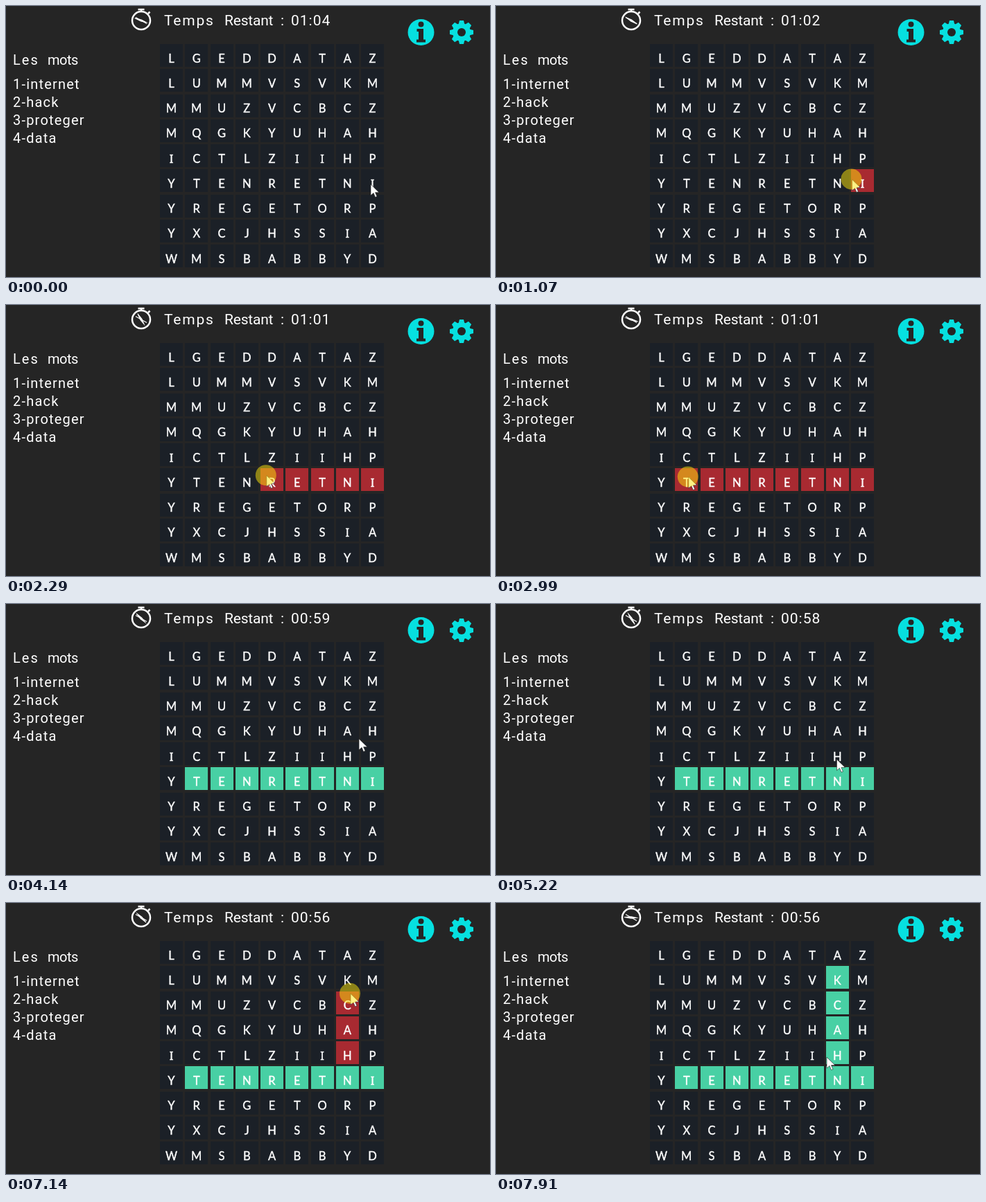
Recreate the animation shown at these times as an HTML page. Size 698 px wide and 392 px high, loop 7990 ms.

```html
<!DOCTYPE html>
<html lang="fr">
<head>
<meta charset="utf-8">
<title>Mots mêlés</title>
<style>
  html, body { margin: 0; width: 100%; height: 100%; overflow: hidden; background: #252525; }
  svg { display: block; width: 698px; height: 392px; }
  text { fill: #fff; white-space: pre; }
  .label { font-family: Roboto, sans-serif; }
  .letter { font: 16.5px Lato, sans-serif; text-anchor: middle; stroke: #fff; stroke-width: .4; }
  .serif-i { font-family: "Noto Sans", sans-serif; }
  #grid rect { shape-rendering: crispEdges; }
</style>
</head>
<body>
<svg id="stage" viewBox="0 0 698 392">
  <g fill="none" stroke="#fff" stroke-width="2.5">
    <circle cx="195" cy="21" r="13"/>
    <path d="M190.500 5h9M195 5v4M205 11l2.500-2.500"/>
  </g>
  <path d="M187 16.500L203 25.500" stroke="#fff" stroke-width="1.200"/>
  <path id="hand" fill="#fff" d="M11 0L0 1.700L-10 .5V-.5L0-1.700Z"/>
  <g fill="#06e0e0">
    <circle cx="598.500" cy="38" r="19"/>
    <g id="gear" transform="translate(657 38)"><circle r="13"/></g>
  </g>
  <g fill="#252525">
    <circle cx="657" cy="38" r="6"/>
    <circle cx="598.500" cy="26.500" r="4"/>
    <path d="M592.500 33h9.500v15.500h3v4h-13v-4h3v-11.500h-2.500z"/>
  </g>
  <g id="labels"></g>
  <g id="grid"></g>
  <g id="pointer">
    <path d="M0 0V16L4 12.500L6.500 18.500L9 17.500L6.500 11.700H12Z" fill="#fff" stroke="#222" stroke-width=".6"/>
    <circle id="press" cx="-1" cy="-.5" r="15" fill="#ffe60a" fill-opacity=".5"/>
  </g>
</svg>
<script>
const LOOP = 7990, STEP = 76.9;
const ROWS = ['LGEDDATAZ', 'LUMMVSVKM', 'MMUZVCBCZ', 'MQGKYUHAH', 'ICTLZIIHP',
              'YTENRETNI', 'YREGETORP', 'YXCJHSSIA', 'WMSBABBYD'];
const LEFT = 222, TOP = 55, PITCH = 36.25, CELL = 33;
const DARK = '#1b2027', RED = '#a82a31', GREEN = '#48d0a4';

// Pointer keyframes: time, x, y
const PATH = [
  [0, 526, 258], [850, 527, 254], [950, 526, 252], [1680, 444, 245], [2990, 277, 249],
  [3370, 279, 247], [3900, 514, 202], [4140, 509, 195], [4800, 495, 226], [5500, 489, 224],
  [5910, 488, 218], [6140, 487, 205], [7140, 497, 131], [7360, 498, 112], [7560, 498, 115],
  [7860, 477, 223]
];
// Each drag starts on one cell and runs along a row or a column
const DRAGS = [
  { from: 910, to: 3150, row: 5, col: 8, axis: 'x' },
  { from: 5600, to: 7460, row: 4, col: 7, axis: 'y' }
];

const byId = id => document.getElementById(id);

function add(parent, tag, attrs, content = '') {
  const node = document.createElementNS('http://www.w3.org/2000/svg', tag);
  for (const name in attrs) node.setAttribute(name, attrs[name]);
  node.textContent = content;
  return parent.appendChild(node);
}

function label(content, x, y, size, spacing) {
  return add(byId('labels'), 'text',
    { x, y, class: 'label', 'font-size': size, 'letter-spacing': spacing }, content);
}

label('Temps', 228, 28, 21, 1.8);
label('Restant', 315, 28, 21, -0.2);
label(':', 396, 28, 21, 0);
const clock = label('', 411, 28, 21, 1);
label('Les', 10, 85, 20, 2);
label('mots', 60, 85, 20, -0.5);
['internet', 'hack', 'proteger', 'data'].forEach((word, i) =>
  label(`${i + 1}-${word}`, 10, 120 + 26 * i, 20, 1.2));

for (let angle = 0; angle < 360; angle += 45)
  add(byId('gear'), 'path', { d: 'M-3 -17H3L4.5 -11H-4.5Z', transform: `rotate(${angle})` });

const cells = ROWS.map((letters, row) => [...letters].map((letter, col) => {
  const x = LEFT + PITCH * col, y = TOP + PITCH * row;
  const cell = add(byId('grid'), 'rect', { x, y, width: CELL, height: CELL });
  const style = letter === 'I' ? 'letter serif-i' : 'letter';
  add(byId('grid'), 'text', { x: x + CELL / 2, y: y + 26.5, class: style }, letter);
  return cell;
}));

function pointerAt(t) {
  const next = PATH.findIndex(key => key[0] > t);
  if (next < 0) return PATH.at(-1).slice(1);
  const [t0, x0, y0] = PATH[next - 1], [t1, x1, y1] = PATH[next];
  const p = (t - t0) / (t1 - t0);
  return [x0 + (x1 - x0) * p, y0 + (y1 - y0) * p];
}

function paintDrag({ from, to, row, col, axis }, t) {
  if (t < from) return;
  const [x, y] = pointerAt(Math.min(t, to));
  const horizontal = axis === 'x';
  const start = horizontal ? col : row;
  const end = Math.floor(horizontal ? (x - LEFT) / PITCH : (y - TOP) / PITCH);
  for (let i = start; i >= Math.min(start, end); i--)
    cells[horizontal ? row : i][horizontal ? i : col].setAttribute('fill', t < to ? RED : GREEN);
}

function draw(now) {
  const time = now % LOOP;
  const t = Math.max(0, Math.floor((time + 15) / STEP) * STEP - 15);

  const left = Math.floor((64050 - t) / 1000);
  const pad = n => String(n).padStart(2, '0');
  clock.textContent = `${pad(Math.floor(left / 60))}:${pad(left % 60)}`;
  byId('hand').setAttribute('transform', `translate(195 21) rotate(${20 + t * 0.18})`);

  cells.flat().forEach(cell => cell.setAttribute('fill', DARK));
  DRAGS.forEach(drag => paintDrag(drag, t));

  byId('pointer').setAttribute('transform', `translate(${pointerAt(t)})`);
  const pressed = DRAGS.some(({ from, to }) => t >= from && t < to);
  byId('press').setAttribute('visibility', pressed ? 'visible' : 'hidden');
}

const begin = performance.now();
function frame() {
  draw(performance.now() - begin);
  requestAnimationFrame(frame);
}
frame();
</script>
</body>
</html>
```
